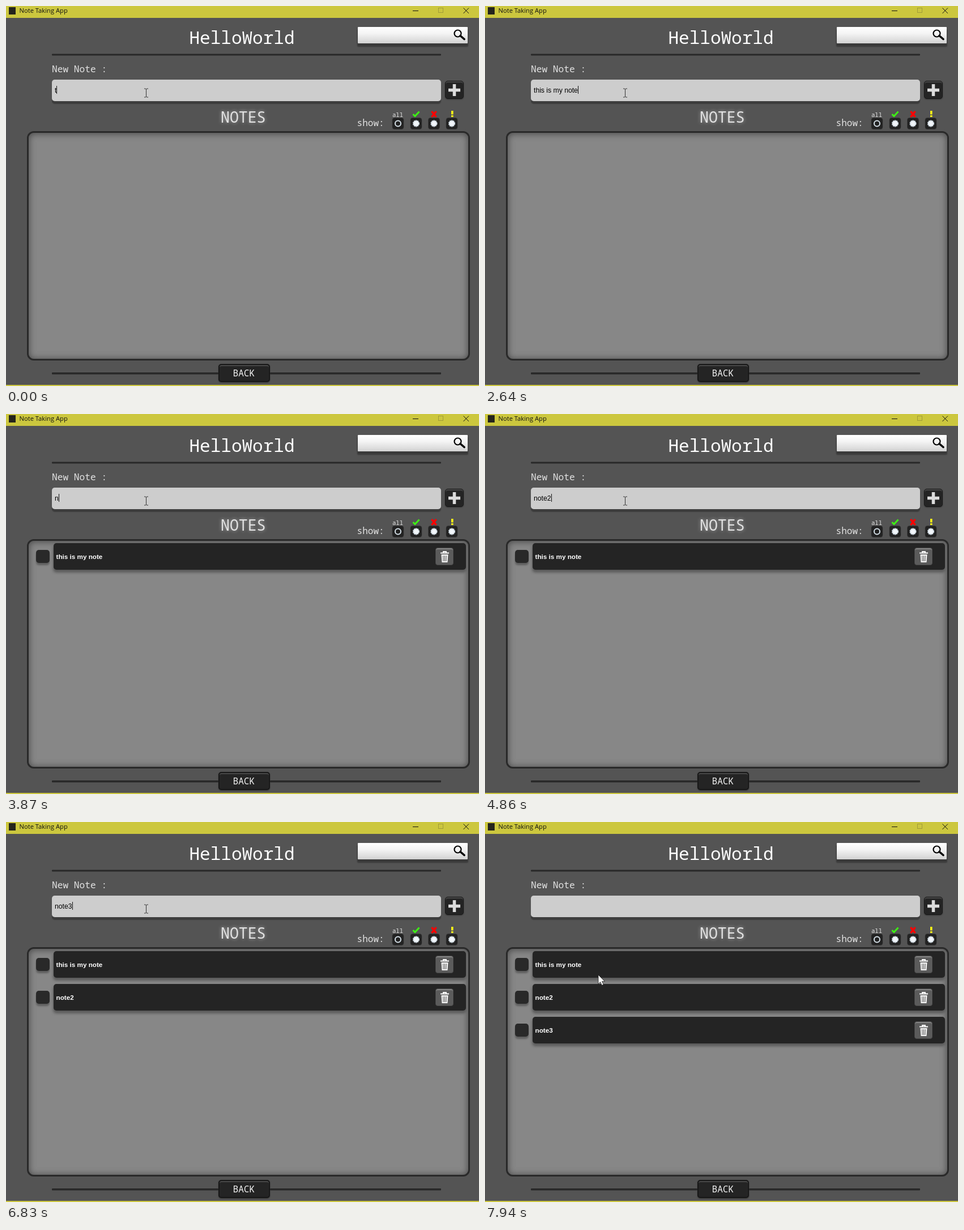
An HTML page that plays this animation: 835x671 px, repeating every 8000 ms.

```html
<!DOCTYPE html>
<html lang="en">
<head>
<meta charset="utf-8">
<title>Note Taking App</title>
<style>
html, body { margin: 0; width: 100%; height: 100%; overflow: hidden; background: #545454; }
#stage { position: relative; width: 835px; height: 671px; overflow: hidden; }
#stage > * { position: absolute; }
svg { left: 0; top: 0; }
.mono { font-family: "Noto Sans Mono", "DejaVu Sans Mono", monospace; fill: #e2e2e2; }
.rule { fill: #282828; }
#bar { width: 835px; height: 21px; background: #ccc73e; }
#foot { top: 669px; width: 835px; height: 2px; background: #ccc73e; }
#search { left: 621px; top: 37px; width: 194px; height: 29px; border-radius: 1px;
  background: linear-gradient(#fff, #f4f4f4 40%, #d2d2d2); box-shadow: 0 5px 2px 1px #3a3a3a; }
#field { left: 81px; top: 130px; width: 687px; height: 38px; border-radius: 5px;
  background: #cdcdcd; box-shadow: 0 5px 1px #3d3d3d; }
#typed { left: 86px; top: 141px; height: 14px; white-space: pre; color: #000;
  font: 12.2px/16px "Liberation Sans", Arial, sans-serif; }
#caret { display: inline-block; width: 1px; height: 14px; background: #111; vertical-align: top; }
#panel { left: 37px; top: 221px; width: 776px; height: 399px; border: 3px solid #292929;
  border-radius: 12px; background: #878787; box-shadow: inset 0 1px 12px 1px #4c4c4c; }
.button { box-sizing: border-box; border-radius: 5px; background: #242424; border: 1px solid #171717;
  box-shadow: inset 0 2px 1px #4a4a4a, 0 1px 2px #333; }
#add { left: 775px; top: 132px; width: 33px; height: 32px; }
#back { left: 375px; top: 632px; width: 91px; height: 32px; border-width: 2px; }
.row { left: 53px; width: 759px; height: 47px; visibility: hidden; }
.row > * { position: absolute; }
.check { left: 0; top: 12px; width: 24px; height: 23px; border-radius: 5px; background: #292929;
  box-shadow: 0 4px 3px #606060; }
.note { left: 31px; top: 0; width: 723px; height: 47px; padding-left: 4.5px; border-radius: 5px;
  background: #242424; box-shadow: 0 4px 4px 1px #5c5c5c; color: #fff;
  font: bold 11.7px/48px "Liberation Sans", Arial, sans-serif; }
.bin { left: 705px; top: 8px; width: 32px; height: 31px; box-sizing: border-box; border-radius: 4px;
  background: #5b5b5b; border: 1px solid #484848; box-shadow: inset 0 2px 1px #858585; }
.bin svg { position: absolute; left: 8px; top: 5px; }
</style>
</head>
<body>
<div id="stage">
  <div id="bar"></div>
  <div id="foot"></div>
  <div id="search"></div>
  <div id="field"></div>
  <div class="button" id="add"></div>
  <div id="panel"></div>
  <svg width="835" height="671">
    <rect x="5" y="2" width="12" height="13" fill="#25251c"/>
    <text x="23.5" y="12" font-family="'Open Sans', 'Noto Sans', sans-serif" font-size="11.2" fill="#111">Note Taking App</text>
    <g fill="none" stroke="#111">
      <path d="M718 8.5h10M807.5 3.5l9.5 9.5M817 3.5l-9.5 9.5"/>
      <rect x="763.5" y="3.5" width="8" height="8" stroke="#a09b38"/>
    </g>

    <text class="mono" x="323.5" y="66.5" font-size="31" style="fill:#fff">HelloWorld</text>
    <circle cx="797.5" cy="48.5" r="6" fill="none" stroke="#000" stroke-width="2.2"/>
    <path d="M802 52.5l7 6" stroke="#000" stroke-width="3.6" stroke-linecap="round"/>

    <rect class="rule" x="81" y="84.5" width="687" height="3" rx="1"/>
    <rect class="rule" x="81" y="647" width="294" height="3.5" rx="1"/>
    <rect class="rule" x="466" y="647" width="302" height="3.5" rx="1"/>

    <text class="mono" x="81" y="117" font-size="16.2">New Note :</text>
    <path d="M791.5 138v21M781 148.5h21" stroke="#dcdcdc" stroke-width="5.5"/>
    <text class="mono" x="379" y="205.5" font-size="26.5" style="text-shadow:0 0 6px #aaa">NOTES</text>
    <text class="mono" x="619.5" y="211.5" font-size="16.1">show:</text>
    <text class="mono" x="682" y="196" font-size="10.6">all</text>
    <g fill="none">
      <path d="M718.5 191l3.5 3.5 7.5-8" stroke="#3df014" stroke-width="3"/>
      <path d="M751.5 186l8 10M759.5 186l-8 10" stroke="#f00" stroke-width="3.6"/>
      <path d="M787.8 185v6.5M787.8 193v3" stroke="#fdf517" stroke-width="3.6"/>
    </g>
    <g id="filters"></g>
  </svg>
  <div class="button" id="back"></div>
  <svg width="835" height="671">
    <text class="mono" x="400.5" y="653.5" font-size="16.1" font-weight="500" style="fill:#f0f0f0">BACK</text>
  </svg>
  <div id="typed"><span id="text"></span><i id="caret"></i></div>
  <div id="rows" style="left:0;top:0"></div>
  <svg width="835" height="671">
    <path id="beam" d="M-3.5 -7.5h2.5l1 1 1-1h2.5M0 -6.5v13M-3.5 7.5h2.5l1-1 1 1h2.5" fill="none" stroke="#333"/>
    <path id="arrow" transform="translate(200 270)" d="M0 0v16l3.7-3.5 2.7 5.8 2.7-1.2-2.6-5.7h5z" fill="#fff" stroke="#222" stroke-width=".8"/>
  </svg>
</div>
<script>
const LOOP = 8000, BLINK = 560;
const byId = id => document.getElementById(id);

// Contents of the input field from each time on
const typing = [
  [0, "t"], [310, "th"], [580, "thi"], [750, "this"], [920, "this "], [1090, "this is"], [1260, "this is "],
  [1670, "this is m"], [1950, "this is my"], [2090, "this is my "], [2230, "this is my n"],
  [2370, "this is my no"], [2500, "this is my not"], [2640, "this is my note"], [2920, ""],
  [3750, "n"], [3890, "no"], [4020, "not"], [4580, "note"], [4860, "note2"], [5300, ""],
  [5860, "n"], [6000, "no"], [6280, "not"], [6560, "note"], [6830, "note3"], [7120, ""]
];
const notes = [[2920, "this is my note"], [5300, "note2"], [7120, "note3"]];

byId("filters").innerHTML = [692, 724, 755.5, 787].map((x, i) => `
  <rect x="${x - 10}" y="197.5" width="20" height="20" rx="4" fill="#222" stroke="#363636" stroke-width=".6"/>
  <circle cx="${x}" cy="207.5" r="5" fill="${i ? "#f2f6fa" : "#222"}" stroke="#d5e0e8" stroke-width="2"
    ${i ? 'stroke-dasharray="2.4 .74"' : ""}/>`).join("");

byId("rows").innerHTML = notes.map(([, label], i) => `
  <div class="row" style="position:absolute;top:${228 + 58 * i}px">
    <div class="check"></div><div class="note">${label}</div>
    <div class="bin"><svg width="15" height="21" fill="none" stroke="#fff">
      <path d="M0 3.5h15M5 2.5v-1.5h5v1.5" stroke-width="1.8"/>
      <path d="M1.5 6h12l-1 14h-10z" fill="#f4f4f4" stroke="none"/>
      <path d="M4.7 8l.4 10M7.5 8v10M10.3 8l-.4 10" stroke="#5b5b5b" stroke-width="1.1"/>
    </svg></div>
  </div>`).join("");
const rows = document.querySelectorAll(".row");

function draw(t) {
  const [since, text] = typing.filter(([at]) => at <= t).pop();
  byId("text").textContent = text;
  byId("caret").style.visibility = t - since < BLINK ? "visible" : "hidden";
  rows.forEach((row, i) => row.style.visibility = t >= notes[i][0] ? "visible" : "hidden");
  const pointing = t >= 7940;
  byId("arrow").style.visibility = pointing ? "visible" : "hidden";
  byId("beam").style.visibility = pointing ? "hidden" : "visible";
  byId("beam").setAttribute("transform", t >= 7810 ? "translate(251.5 151.5)" : "translate(247.5 153.5)");
}

const start = performance.now();
function tick() {
  draw((performance.now() - start) % LOOP);
  requestAnimationFrame(tick);
}
tick();
</script>
</body>
</html>
```
